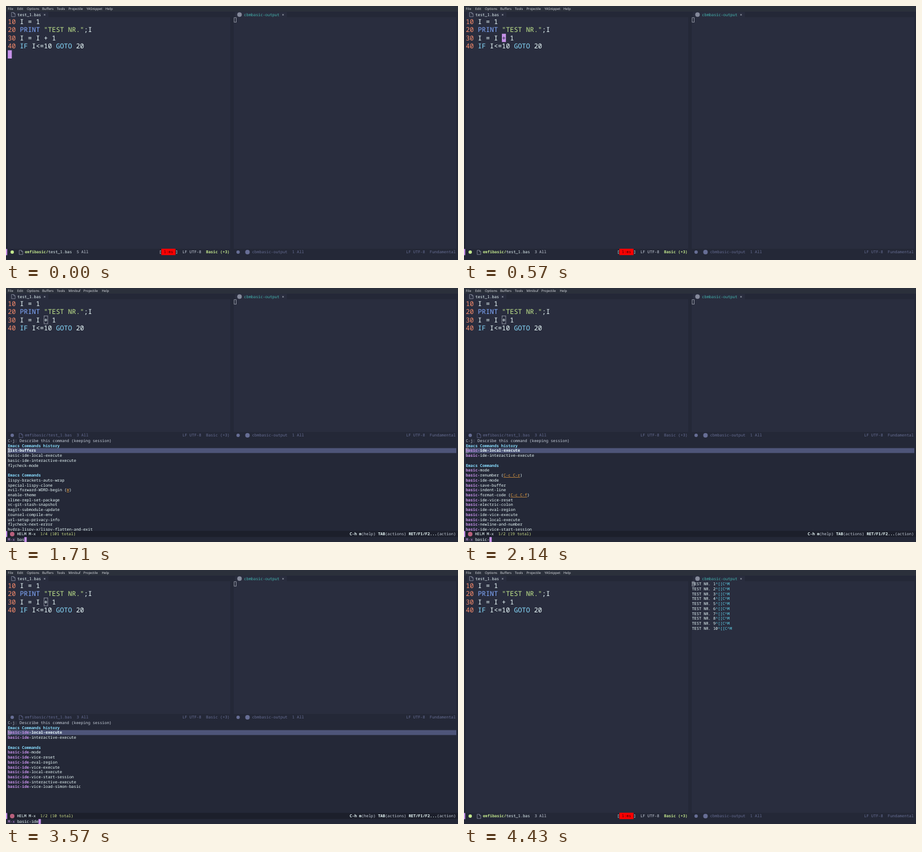
An HTML page for the animation above (5.01 s loop, 800 by 450 pixels).

```html
<!DOCTYPE html>
<html lang="en">
<head>
<meta charset="utf-8">
<title>BASIC in the editor</title>
<style>
  html, body { margin: 0; width: 100%; height: 100%; overflow: hidden; background: #242837; }
  svg { display: block; width: 100vw; height: 100vh; }
  text { white-space: pre; text-rendering: geometricPrecision; font: 6.96px "Noto Sans Mono", monospace; }
  text.code { font-size: 11.83px; }
  text.menu { font: 5.9px "Noto Sans", sans-serif; }
  .b { font-weight: 700; }
  .u { text-decoration: underline; }
</style>
</head>
<body>
<svg id="stage" viewBox="0 0 800 450"></svg>
<script>
const LOOP = 5010;
const C = {
  bg: '#292d3e', alt: '#242837', dark: '#1c1f2b', fg: '#eeffff', soft: '#c8d0dc', grey: '#676e95',
  select: '#4e5579', orange: '#f78c6c', green: '#c3e88d', cyan: '#89ddff', blue: '#82aaff',
  purple: '#c792ea', teal: '#44b9b1', bell: '#ff5370', box: '#a4a9b4'
};
const SMALL = 4.176, BIG = 7.1, ROW = 14.6, LINE = 8.73;

const CODE = [
  [['10', C.orange], [' I = 1']],
  [['20', C.orange], [' '], ['PRINT', C.blue], [' '], ['"TEST NR."', C.green], [';I']],
  [['30', C.orange], [' I = I + 1']],
  [['40', C.orange], [' '], ['IF', C.cyan], [' I<=10 '], ['GOTO', C.cyan], [' 20']],
  []
];

// Candidates; a key binding may follow after "|".
const ide = s => s.split(' ').map(n => 'basic-ide-' + n);
const recent = ide('local-execute interactive-execute');
const ideCommands = ide('mode vice-reset eval-region vice-execute local-execute ' +
  'vice-start-session interactive-execute vice-load-simon-basic');
const LISTS = {
  all: {
    count: '1/4 (101 total)',
    history: ['list-buffers', ...recent, 'flycheck-mode'],
    commands: ['lispy-brackets-auto-wrap', 'special-lispy-clone', 'evil-forward-WORD-begin|W',
      'enable-theme', 'slime-repl-set-package', 'vc-git-stash-snapshot', 'magit-submodule-update',
      'counsel-compile-env', 'url-setup-privacy-info', 'flycheck-next-error',
      'hydra-lispy-x/lispy-flatten-and-exit']
  },
  ba: {
    count: '1/2 (67 total)',
    history: recent,
    commands: ['bat-mode', 'basic-mode', 'balance-windows', 'basic-renumber|C-c C-r', 'basic-ide-mode',
      'backward-list', 'basic-save-buffer', 'basic-indent-line', 'back-to-indentation',
      'basic-ide-vice-reset', 'basic-electric-colon', 'basic-ide-eval-region', 'backward-sentence']
  },
  basic: {
    count: '1/2 (19 total)',
    history: recent,
    commands: ['basic-mode', 'basic-renumber|C-c C-r', 'basic-ide-mode', 'basic-save-buffer',
      'basic-indent-line', 'basic-format-code|C-c C-f', 'basic-ide-vice-reset', 'basic-electric-colon',
      'basic-ide-eval-region', 'basic-ide-vice-execute', 'basic-ide-local-execute',
      'basic-newline-and-number', 'basic-ide-vice-start-session']
  },
  basicI: {
    count: '1/2 (11 total)',
    history: recent,
    commands: [ideCommands[0], 'basic-indent-line', ...ideCommands.slice(1)]
  },
  ide: { count: '1/2 (10 total)', history: recent, commands: ideCommands }
};

const helm = (input, list, match, blink) => ({ helm: true, input, list, match, blink });
const TIMELINE = [
  [0, { line: 5, col: 0 }],
  [140, { line: 5, col: 0, bell: true, echo: 'End of buffer' }],
  [290, { line: 5, col: 0, echo: 'End of buffer' }],
  [430, { line: 4, col: 9 }],
  [570, { line: 3, col: 9 }],
  [1000, helm('', 'all', 0)],
  [1430, helm('', 'all', 0, true)],
  [1570, helm('b', 'all', 0)],
  [1710, helm('bas', 'all', 0)],
  [1860, helm('basi', 'ba', 2)],
  [2000, helm('basic', 'basic', 4)],
  [2140, helm('basic-', 'basic', 6)],
  [2430, helm('basic-id', 'basicI', 7)],
  [2570, helm('basic-ide', 'ide', 8)],
  [2710, helm('basic-ide', 'ide', 9)],
  [3140, helm('basic-ide', 'ide', 9, true)],
  [3570, helm('basic-ide', 'ide', 9)],
  [4000, { line: 3, col: 9, output: true }],
  [4430, { line: 3, col: 9, output: true, blink: true }]
];

const escapeText = s => s.replace(/&/g, '&amp;').replace(/</g, '&lt;');
const rect = (x, y, w, h, fill) => `<rect x="${x}" y="${y}" width="${w}" height="${h}" fill="${fill}"/>`;
const hollow = (x, y, w, h) =>
  `<rect x="${x}" y="${y}" width="${w}" height="${h}" fill="none" stroke="${C.box}" stroke-width=".8"/>`;
const dot = (x, y, r, fill) => `<circle cx="${x}" cy="${y}" r="${r}" fill="${fill}"/>`;
const page = (x, y, color) =>
  `<path d="M${x} ${y}h4l2.4 2.4v5h-6.4zM${x + 4} ${y}v2.4h2.4" fill="none" stroke="${color}" stroke-width=".7"/>`;

// Spans are [text, colour, classes]; y is the middle of the capitals.
function text(x, y, spans, cls = '') {
  const drop = cls === 'code' ? 4.2 : cls === 'menu' ? 2.1 : 2.45;
  const body = spans.map(([s, color = C.fg, c = '']) =>
    `<tspan fill="${color}" class="${c}">${escapeText(s)}</tspan>`).join('');
  return `<text x="${x}" y="${y + drop}" class="${cls}">${body}</text>`;
}
const word = (x, y, s, color, cls) => text(x, y, [[s, color, cls]]);

function menu(inHelm) {
  const tail = inHelm
    ? [['Minibuf', 110.5], ['Projectile', 137], ['Help', 169.5]]
    : [['Projectile', 110.5], ['YASnippet', 142.5], ['Help', 176]];
  const items = [['File', 3.3], ['Edit', 19.8], ['Options', 37], ['Buffers', 64], ['Tools', 90], ...tail];
  return rect(0, 0, 800, 10, '#2b303b') +
    items.map(([s, x]) => text(x, 5, [[s, '#d3d6dc']], 'menu')).join('');
}

function tabs() {
  return rect(0, 10, 800, 10, C.alt) + rect(5, 10.5, 70, 9.5, C.bg) + rect(405, 10.5, 92, 9.5, C.bg) +
    page(9.8, 11.5, '#9da3b4') + word(20.3, 15.5, 'test_1.bas') + word(66.2, 15.5, '×', C.soft) +
    dot(413.3, 15.3, 4, '#858a9b') + word(421.3, 15.8, 'cbmbasic-output', C.teal) +
    word(488.2, 15.8, '×', C.soft);
}

function code(s) {
  const rows = CODE.map((spans, i) => text(3.2, 27.3 + i * ROW, spans, 'code')).join('');
  if (s.helm) return rows + hollow(67.3, 49.5, 6.6, 14);
  if (s.blink) return rows;
  const glyph = CODE[s.line - 1].map(p => p[0]).join('')[s.col] || '';
  const x = 3.2 + s.col * BIG, row = s.line - 1;
  return rows + rect(x, 20 + row * ROW, BIG, ROW, C.purple) +
    text(x, 27.3 + row * ROW, [[glyph, C.bg]], 'code');
}

function output(s) {
  let out = hollow(403.8, 20.7, 3.6, 8);
  if (s.output) {
    for (let i = 1; i <= 10; i++) {
      out += text(403.4, 24.6 + (i - 1) * 8.77, [['TEST NR. ' + i], ['^[[C^M', '#60d0e8']]);
    }
  }
  return out;
}

function modeLines(s) {
  const y = s.helm ? 261 : 436, top = y - 6, on = !s.helm;
  const tint = color => on ? color : C.grey;
  const bold = on ? 'b' : '';
  let out = rect(0, top, 800, 11.4, C.alt);
  if (s.bell) out += rect(0, top, 399, 11.4, C.bell);
  if (on) {
    out += rect(0, top + .5, 2.2, 11, C.purple) + word(271, y, '[', C.fg) +
      rect(275, top, 25, 11.3, '#ff0000') + word(279.2, y, '1:ms', '#300008') + word(300, y, ']', C.fg);
  }
  return out + dot(11, y + .1, 3, tint(C.green)) + page(23.3, y - 3.2, tint('#9da3b4')) +
    text(33.2, y, [['emfibasic/', tint(C.green), bold], ['test_1.bas', tint(C.fg)]]) +
    word(125, y, `${s.line || 3} All`, tint(C.soft)) +
    word(312.3, y, 'LF UTF-8', tint(C.soft)) + word(354, y, 'Basic (+3)', tint(C.green), bold) +
    dot(410.8, y + .1, 3, C.grey) + dot(427.4, y, 4, C.grey) +
    word(435.7, y, 'cbmbasic-output', C.grey) + word(506.5, y, '1 All', C.grey) +
    word(708.3, y, 'LF UTF-8', C.grey) + word(750, y, 'Fundamental', C.grey);
}

function candidate(y, entry, match, selected) {
  const [name, key] = entry.split('|');
  const spans = [[name.slice(0, match), C.purple, 'b'], [name.slice(match), C.fg, selected ? 'b' : '']];
  if (key) spans.push([' ('], [key, '#f5a742', 'u'], [')']);
  return text(3.2, y, spans);
}

function helmPanel(s) {
  const list = LISTS[s.list];
  let y = 270.5;
  let out = rect(0, 266.2, 800, 183.8, C.alt) +
    word(3.2, y, 'C-j: Describe this command (keeping session)', C.soft) +
    word(3.2, y += LINE, 'Emacs Commands history', C.cyan, 'b');
  list.history.forEach((name, i) => {
    y += LINE;
    if (!i) out += rect(3, y - 4.3, 794, 8.7, C.select) + hollow(3.5, y - 3.9, 3.6, 7.9);
    out += candidate(y, name, s.match, !i);
  });
  out += word(3.2, y += 2 * LINE, 'Emacs Commands', C.cyan, 'b');
  list.commands.forEach(name => { out += candidate(y += LINE, name, s.match); });

  const inputX = 3.2 + 4 * SMALL;
  out += rect(0, 430.3, 800, 11, C.dark) + rect(0, 430.5, 2.2, 11, C.purple) +
    dot(11, 436, 4, '#b8607c') + word(19.4, 436, 'HELM M-x') + word(60.8, 436, list.count, '#d5e88d') +
    text(608.3, 436, [['C-h m', C.fg, 'b'], ['(help) ', C.soft], ['TAB', C.fg, 'b'],
      ['(actions) ', C.soft], ['RET/F1/F2...', C.fg, 'b'], ['(action)', C.soft]]) +
    rect(0, 441.3, 800, 8.7, C.alt) +
    text(3.2, 445.8, [['M-x ', C.purple], [s.input]]);
  if (!s.blink) out += rect(inputX + s.input.length * SMALL, 441.3, SMALL, 8.7, C.purple);
  return out;
}

function draw(s) {
  return rect(0, 0, 800, 450, C.alt) + rect(3, 20, 394, 411, C.bg) + rect(403, 20, 394, 411, C.bg) +
    menu(s.helm) + tabs() + code(s) + output(s) + modeLines(s) +
    (s.helm ? helmPanel(s) : s.echo ? word(3.2, 445.8, s.echo) : '');
}

const stage = document.getElementById('stage');
let shown = null;
function tick() {
  const t = performance.now() % LOOP;
  const state = TIMELINE.filter(([start]) => start <= t).pop()[1];
  if (state !== shown) stage.innerHTML = draw(shown = state);
  requestAnimationFrame(tick);
}
tick();
</script>
</body>
</html>
```
